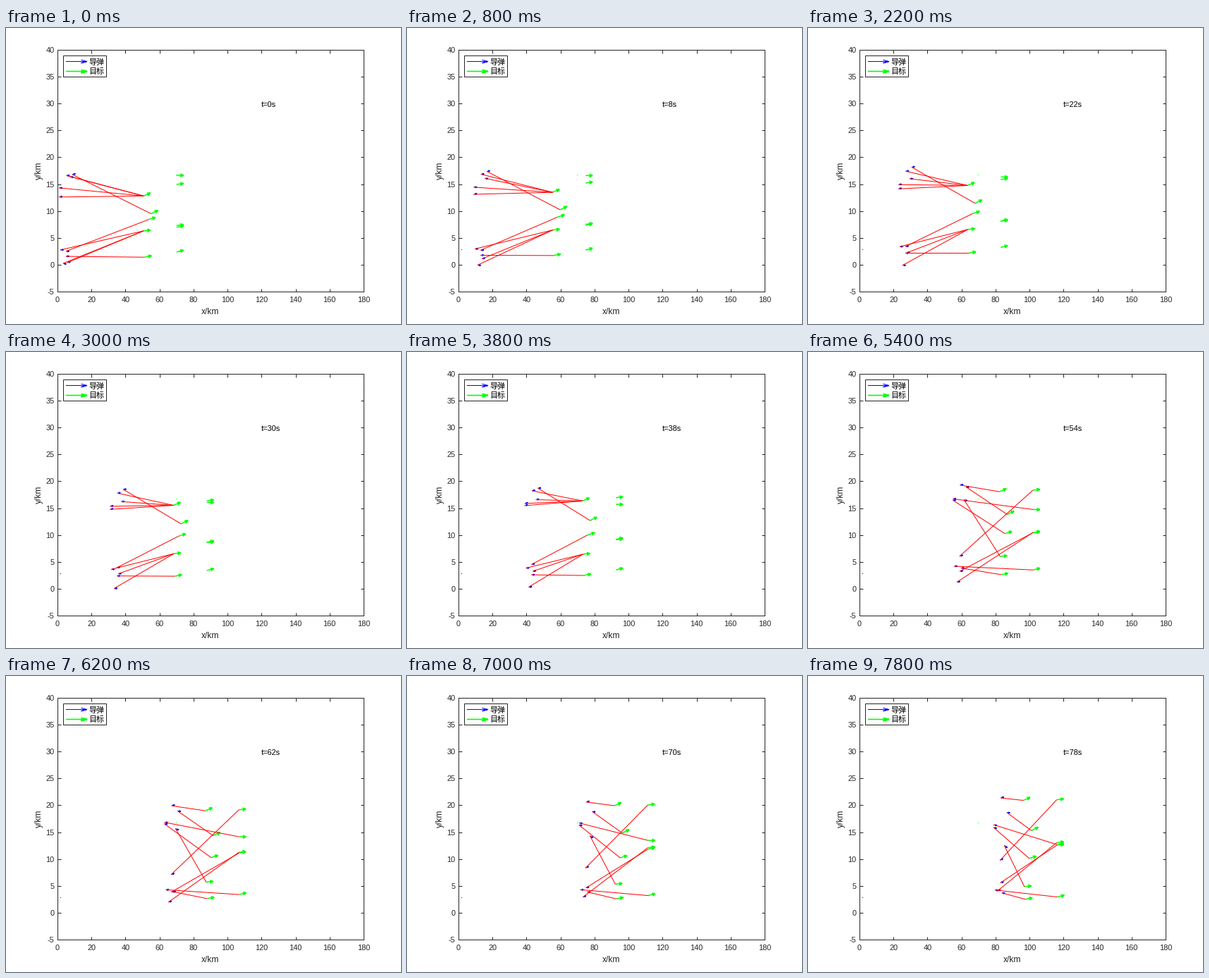
A matplotlib script for the animation above (8 s loop, 560 by 420 pixels).

```python
import numpy as np
import matplotlib.pyplot as plt
from matplotlib.animation import FuncAnimation
from matplotlib.patches import Rectangle

plt.rcParams["font.family"] = "Liberation Sans"
plt.rcParams["axes.unicode_minus"] = False

FRAMES, INTERVAL, STEP = 40, 200, 2      # each frame advances 2 s
LEFT, TOP, W, H = 73, 31, 434, 343       # plot box in pixels
BLUE, GREEN, RED, INK = "#0000ff", "#00ff00", "#ff0000", "#262626"

# Targets: x, y in km, heading in degrees, turn rate in degrees per second
TARGETS = [
    (50.6, 12.8, 8, .053), (55, 9.5, 9, -.047), (53.5, 8.4, 6, -.1),
    (50.6, 6.3, 2.3, -.105), (51.2, 1.4, 4, -.068),
    (70, 16.65, 0, -.126), (70, 14.95, 2.7, .124), (70, 7.3, 2.3, .124),
    (70, 6.95, 4.4, .066), (70, 2.35, 5, -.11),
]
# Missiles: x, y, heading, first target, second target
MISSILES = [
    (8.7, 16.8, 4.5, 1, 1), (5.2, 16.6, 1.7, 0, 0), (7.5, 16.4, -3, 0, 3),
    (1, 14.3, .5, 0, 5), (1, 12.6, 3.5, 0, 2), (1.7, 2.75, 1.2, 3, 9),
    (5, 2.5, .8, 2, 6), (5, 1.55, 1.4, 4, 8), (3.3, .25, -3, 3, 7),
    (5.8, .4, 5.1, 3, 4),
]
TARGET_SPEED, MISSILE_SPEED = .595, 1.0  # km/s
GAIN, SWITCH = 1.45, 40                  # navigation constant, re-pairing time


def simulate(dt=.1):
    """Fly targets on steady turns and missiles by proportional navigation."""
    tx, ty, th, turn = np.array(TARGETS).T
    mx, my, mh, first, second = np.array(MISSILES).T
    target, missile = tx + 1j * ty, mx + 1j * my
    th, turn, mh = np.radians(th), np.radians(turn), np.radians(mh)
    states = []
    per_frame = round(STEP / dt)
    for n in range(FRAMES * per_frame):
        pair = (first if n * dt < SWITCH else second).astype(int)
        if n % per_frame == 0:
            states.append((target, missile, mh, pair))
        tv = TARGET_SPEED * np.exp(1j * th)
        mv = MISSILE_SPEED * np.exp(1j * mh)
        sight, closing = target[pair] - missile, tv[pair] - mv
        sight_rate = (sight.conj() * closing).imag / abs(sight) ** 2
        target, missile = target + tv * dt, missile + mv * dt
        th, mh = th + turn * dt, mh + GAIN * sight_rate * dt
    return states


fig = plt.figure(figsize=(7, 5.25), dpi=80, facecolor="white")


def px(n):
    return n * 72 / fig.dpi


def to_px(z):
    return LEFT + z.real * W / 180, TOP + (40 - z.imag) * H / 45


# Plot box with inward ticks
box = fig.add_axes([LEFT / 560, 1 - (TOP + H) / 420, W / 560, H / 420])
box.set(xlim=(0, 180), ylim=(-5, 40),
        xticks=range(0, 181, 20), yticks=range(-5, 41, 5))
box.tick_params(direction="in", top=True, right=True, length=px(4.5),
                width=px(1), color=INK, labelcolor=INK, labelsize=px(11))
box.tick_params(axis="x", pad=px(7))
box.tick_params(axis="y", pad=px(4.5))
for side in box.spines.values():
    side.set(linewidth=px(1), color=INK)

# Pixel stage for everything else
stage = fig.add_axes([0, 0, 1, 1])
stage.set(xlim=(0, 560), ylim=(420, 0))
stage.axis("off")


def line(color, width, z=2):
    return stage.plot([], [], color=color, lw=px(width), zorder=z,
                      solid_capstyle="butt", solid_joinstyle="bevel")[0]


def label(x, y, s, size=11, color=INK, **kw):
    return stage.text(x, y, s, fontsize=px(size), color=color,
                      va="baseline", **kw)


def arrow(x, y, dx, dy, head, half):
    """Shaft plus open V head as one polyline."""
    n = np.hypot(dx, dy)
    ux, uy = dx / n, dy / n
    tx, ty = x + dx, y + dy
    bx, by = tx - head * ux, ty - head * uy
    return ([x, tx, bx - half * uy, tx, bx + half * uy],
            [y, ty, by + half * ux, ty, by - half * ux])


def km_arrow(z, heading, length, head, half):
    x, y = to_px(z)
    x2, y2 = to_px(z + length * np.exp(1j * heading))
    return arrow(x, y, x2 - x, y2 - y, head, half)


label(290, 405.5, "x/km", 12, ha="center")
label(49.5, 202, "y/km", 12, ha="center", rotation=90, rotation_mode="anchor")
clock = label(361.5, 111.5, "", color="black")

# Legend
stage.add_patch(Rectangle((81, 39), 61, 30, fc="white", ec=INK, lw=px(1), zorder=5))
for y, name, color, width in ((47.5, "导弹", BLUE, 1), (61.5, "目标", GREEN, 1.6)):
    line(color, width, 6).set_data(*arrow(85, y, 30, 0, 8.5, 2.2))
    label(117.5, y + 4, name, color="black", family="Noto Sans CJK JP", zorder=6)

states = simulate()

# Small marks left at two starting points
for z, color in ((states[0][1][5], BLUE), (states[0][0][5], GREEN)):
    x, y = to_px(z)
    stage.add_patch(Rectangle((x - .5, y - .5), 1, 1, fc=color, lw=0))

blues = [line(BLUE, 1, 3) for _ in MISSILES]
greens = [line(GREEN, 1.5, 3) for _ in TARGETS]
reds = [line(RED, 1, 4) for _ in MISSILES]


def draw(i):
    target, missile, heading, pair = states[i]
    for g, z, spec in zip(greens, target, TARGETS):
        g.set_data(*km_arrow(z, np.radians(spec[2]), 4, 4.2, 2))
    for b, r, z, a, j in zip(blues, reds, missile, heading, pair):
        b.set_data(*km_arrow(z, a, 1.8, 2.2, 1.1))
        r.set_data(*zip(to_px(z), to_px(target[j])))
    clock.set_text(f"t={i * STEP}s")
    return [*blues, *greens, *reds, clock]


anim = FuncAnimation(fig, draw, frames=FRAMES, init_func=lambda: draw(0),
                     interval=INTERVAL, repeat=True, repeat_delay=0, blit=False)
plt.show()
```
